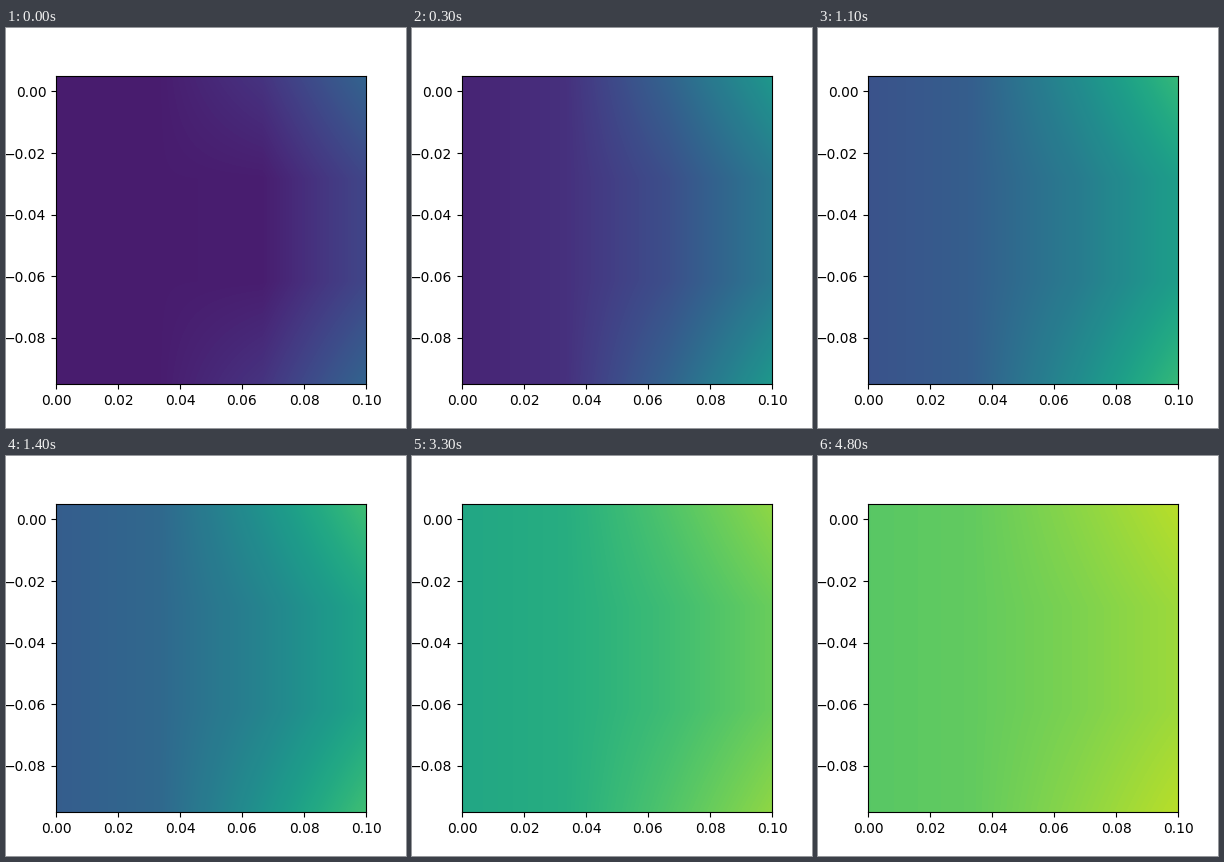
These frames come from a looping animation (400 px wide and 400 px high, 5 s). A matplotlib script:

```python
import numpy as np
import matplotlib.pyplot as plt
from matplotlib.animation import FuncAnimation

FRAMES, INTERVAL = 50, 100
WIDTH, HEIGHT = 310, 308

# How long each simulation step is held, in ms, as runs of equal holds.
HOLDS = np.repeat([100, 200, 300, 200, 300], [3, 4, 2, 14, 1])
STARTS = np.concatenate([[0], np.cumsum(HOLDS)])


def node_grid(edge, middle):
    """4x4 nodes, mirrored between top and bottom."""
    return np.array([edge, middle, middle, edge])


# The plate heats towards 1; its deficit is a sum of two decaying modes.
SLOW_RATE, FAST_RATE = 0.064, 0.38
SLOW = node_grid([1.2, 1.12, 0.81, 0.495], [1.2, 1.12, 0.92, 0.68])
FAST = node_grid([-0.278, -0.197, 0.04, 0.185], [-0.278, -0.197, 0, 0.11])


def hat_weights(count):
    """Linear interpolation weights from 4 even nodes to pixel centres."""
    position = (np.arange(count) + 0.5) / count * 3
    return np.clip(1 - abs(position[:, None] - np.arange(4)), 0, 1)


ROW_WEIGHTS, COL_WEIGHTS = hat_weights(HEIGHT), hat_weights(WIDTH)


def field(step):
    nodes = (1 - SLOW * np.exp(-SLOW_RATE * step)
             - FAST * np.exp(-FAST_RATE * step))
    return ROW_WEIGHTS @ nodes @ COL_WEIGHTS.T


fig, ax = plt.subplots(figsize=(4, 4), dpi=100)
# The right limit sits just past 0.1 so tick labels round to the left pixel.
image = ax.imshow(field(0), cmap="viridis", vmin=0, vmax=1, aspect="auto",
                  extent=(0, np.nextafter(0.1, 1), -0.095, 0.005),
                  interpolation="nearest")


def update(frame):
    step = np.searchsorted(STARTS, frame * INTERVAL, side="right") - 1
    image.set_data(field(step))
    return [image]


anim = FuncAnimation(fig, update, frames=FRAMES, interval=INTERVAL,
                     repeat=True, repeat_delay=0)
plt.show()
```
